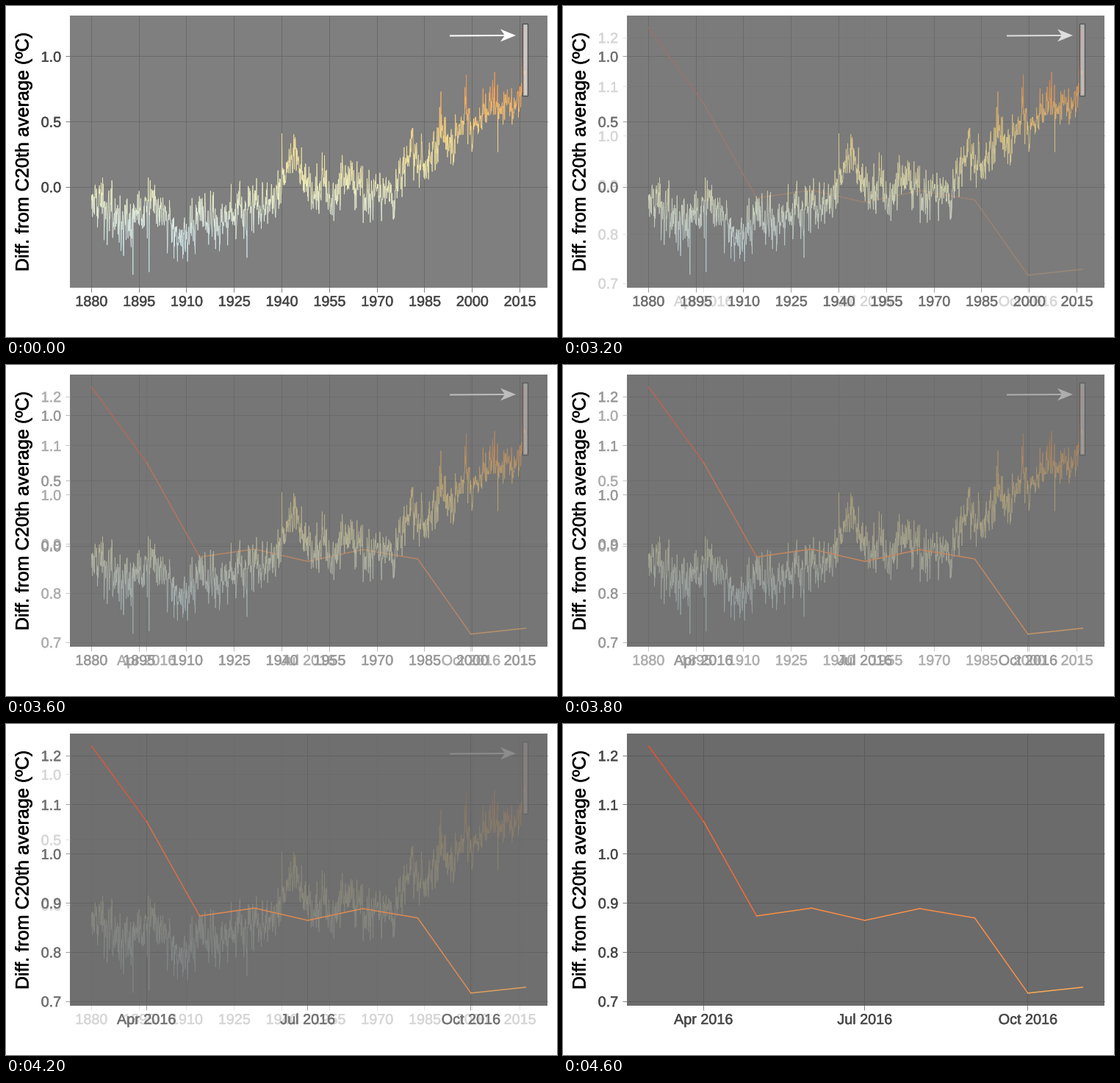
Write a matplotlib script that moves like this. It is 750 by 450 pixels and loops after 7.6 s.

```python
import numpy as np
import matplotlib.pyplot as plt
from matplotlib.animation import FuncAnimation
from matplotlib.collections import LineCollection
from matplotlib.colors import to_rgb
from matplotlib.patches import Polygon, Rectangle
from matplotlib.patheffects import withStroke

W, H, DPI = 750, 450, 100
PX = 72 / DPI  # points per pixel
STEP, FRAMES = 200, 38
FADE_START, FADE_STEPS = 14, 9

LEFT, TOP, RIGHT, BOTTOM = 87, 13, 737, 383
X0, X1 = 116.3, 707.6
WHITE = np.ones(3)
LABEL = "#484848"

plt.rcParams["font.family"] = "Liberation Sans"
fig = plt.figure(figsize=(W / DPI, H / DPI), dpi=DPI, facecolor="white")
ax = fig.add_axes([0, 0, 1, 1])
ax.set(xlim=(0, W), ylim=(H, 0))
ax.axis("off")


def rgb(color):
    return np.array(to_rgb(color))


def heat(values):
    """Blue to yellow to red, by temperature."""
    stops = [-0.68, -0.3, 0, 0.4, 0.72, 0.9, 1.22]
    cols = np.array([to_rgb(c) for c in (
        "#bfe2ee", "#deeeea", "#f3f3c0", "#fadd8a",
        "#fdaa55", "#fb8a43", "#f04e2c")])
    return np.stack([np.interp(values, stops, c) for c in cols.T], axis=1)


def write(x, y, text, size, **kw):
    return ax.text(x, y, text, fontsize=size * PX, va="baseline",
                   path_effects=[withStroke(linewidth=0.35)], **kw)


class Chart:
    """One plot whose colours fade towards the other plot's backdrop."""

    def __init__(self, panel, other_panel, grid):
        self.panel, self.other = rgb(panel), rgb(other_panel)
        self.grid = grid
        self.items = []

    def add(self, artist, color, z, on_panel=True):
        color = rgb(color) if isinstance(color, str) else color
        self.items.append((artist, color, self.other if on_panel else WHITE, z))

    def rule(self, xs, ys, color, z, on_panel=True, width=1):
        line, = ax.plot(xs, ys, lw=width * PX, solid_capstyle="butt")
        self.add(line, color, z, on_panel)

    def label(self, x, y, text, ha):
        self.add(write(x, y, text, 19.8, ha=ha), LABEL, 6, False)

    def x_tick(self, x, text):
        px = np.floor(x)
        self.rule([px, px], [TOP, BOTTOM], self.grid, 1)
        self.rule([px, px], [BOTTOM, BOTTOM + 6], "#808080", 1, False)
        self.label(x, 408, text, "center")

    def y_tick(self, y, text):
        py = np.floor(y)
        self.rule([LEFT, RIGHT], [py, py], self.grid, 1)
        self.rule([LEFT - 6, LEFT], [py, py], "#808080", 1, False)
        self.label(75, y + 7, text, "right")

    def curve(self, xs, ys, values, width):
        pts = np.column_stack([xs, ys])
        segs = np.stack([pts[:-1], pts[1:]], axis=1)
        lines = LineCollection(segs, linewidths=width * PX, capstyle="round")
        ax.add_collection(lines, autolim=False)
        self.add(lines, heat(values[:-1]), 3)

    def show(self, weight):
        for artist, color, back, z in self.items:
            mixed = weight * color + (1 - weight) * back
            artist.set_color(tuple(mixed) if mixed.ndim == 1 else mixed)
            artist.set_zorder(z + (weight > 0.5))
            artist.set_visible(weight > 0)


# March to November 2016
recent = np.array([1.22, 1.067, 0.874, 0.89, 0.865, 0.889, 0.87, 0.717, 0.729])


def monthly_record():
    """Piecewise trend with seeded monthly noise and a few marked extremes."""
    trend = [
        (1880, -0.1), (1892, -0.3), (1899, -0.1), (1909, -0.42), (1915, -0.17),
        (1918, -0.27), (1937, -0.1), (1944, 0.25), (1950, -0.1), (1953, 0.06),
        (1956, -0.14), (1959, 0.1), (1965, -0.06), (1976, -0.03), (1980, 0.26),
        (1985, 0.18), (1990, 0.42), (1993, 0.27), (1998, 0.58), (2000, 0.42),
        (2005, 0.62), (2013, 0.62), (2015.6, 0.76)]
    extremes = [(1893.1, -0.67), (1898.2, -0.65), (1929, -0.54), (1940, 0.41),
                (1990.1, 0.73), (1998.1, 0.86), (2007, 0.88), (2008, 0.27)]
    months = 136 * 12 + 11
    years = 1880 + np.arange(months) / 12

    kicks = np.random.default_rng(12).standard_t(6, months)
    noise = np.zeros(months)
    for i in range(1, months):
        noise[i] = 0.5 * noise[i - 1] + 0.75 * kicks[i]
    spread = np.interp(years, [1880, 2016], [0.1, 0.075])
    values = np.interp(years, *zip(*trend)) + spread * np.clip(noise, -2.6, 2.6)
    for year, v in extremes:
        values[round((year - 1880) * 12)] = v
    values[-14:-9] = np.linspace(0.92, 1.19, 5)
    values[-9:] = recent
    return values


# Whole record since 1880
long_chart = Chart("#7f7f7f", "#6b6b6b", "#6a6a6a")
for year in range(1880, 2016, 15):
    long_chart.x_tick(X0 + (year - 1880) * 4.3206, str(year))
for v in (0, 0.5, 1):
    long_chart.y_tick(246.2 - 177.4 * v, f"{v:.1f}")
record = monthly_record()
long_chart.curve(np.linspace(X0, X1, len(record)), 246.2 - 177.4 * record, record, 0.8)

box = ax.add_patch(Rectangle((703, 24), 7, 98, fc="white", ec="none", zorder=5))
edge = [(703, 24), (710, 24), (710, 122), (703, 122), (703, 24)]
long_chart.rule(*zip(*edge), "#505050", 5.1, width=1.4)
long_chart.rule([604, 682], [40.5, 40], "#ffffff", 5, width=2)
head = Polygon([(694, 40), (673, 48.5), (679, 40), (673, 31.5)], lw=0)
long_chart.add(ax.add_patch(head), "#ffffff", 5)

# Last months only
short_chart = Chart("#6b6b6b", "#7f7f7f", "#5a5a5a")
firsts = np.arange("2016-03", "2016-12", dtype="datetime64[M]").astype("datetime64[D]")
days = (firsts - firsts[0]).astype(int)
dates = X0 + (X1 - X0) * days / days[-1]
for i, name in ((1, "Apr"), (4, "Jul"), (7, "Oct")):
    short_chart.x_tick(dates[i], f"{name} 2016")
for v in np.arange(7, 13) / 10:
    short_chart.y_tick(43.2 + (1.2 - v) * 668, f"{v:.1f}")
short_chart.curve(dates, 43.2 + (1.2 - recent) * 668, recent, 1.5)

panel = ax.add_patch(Rectangle((LEFT, TOP), RIGHT - LEFT, BOTTOM - TOP, lw=0, zorder=0))
write(30.5, 198, "Diff. from C20th average (ºC)", 25.2, color="black",
      ha="center", rotation=90, rotation_mode="anchor")


def draw(i):
    t = np.clip((i - FADE_START) / FADE_STEPS, 0, 1)
    panel.set_facecolor(tuple((1 - t) * long_chart.panel + t * short_chart.panel))
    long_chart.show(1 - t)
    short_chart.show(t)
    box.set_alpha(0.57 * (1 - t))
    return []


anim = FuncAnimation(fig, draw, frames=FRAMES, interval=STEP, repeat=True)
plt.show()
```
